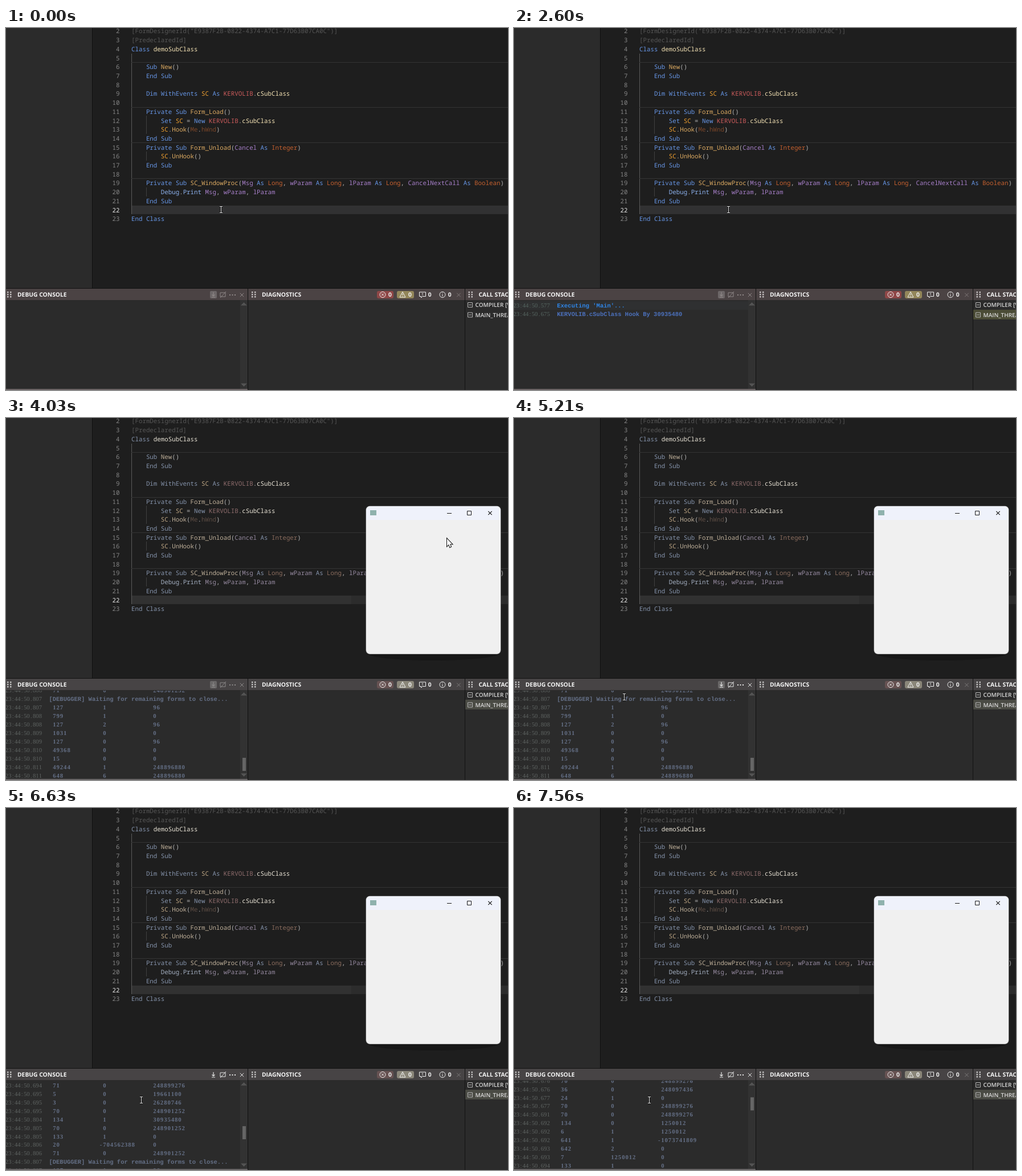
An HTML page with a canvas that plays this animation: 881 px wide and 636 px high, repeating every 7.99 s.

```html
<!DOCTYPE html>
<html lang="en">
<head>
<meta charset="utf-8">
<title>Debug session</title>
<style>
html, body { margin: 0; width: 100%; height: 100%; overflow: hidden; background: #1e1e1e; }
canvas { position: absolute; left: 0; top: 0; }
</style>
</head>
<body>
<canvas id="ide" width="881" height="636"></canvas>
<canvas id="top" width="881" height="636"></canvas>
<script>
const LOOP = 7990;
const ide = document.getElementById('ide');
const base = ide.getContext('2d');
const over = document.getElementById('top').getContext('2d');
let c = base;

const UI = '"Open Sans", "Noto Sans", sans-serif';
const TITLE = '700 10.3px ' + UI;
const CODE_FONT = '10.79px "Noto Sans Mono", monospace';
const STAMP_FONT = '10.67px "Liberation Serif", serif';
const MONO = 'bold 10.48px "Liberation Mono", monospace';
const CW = 6.474, LINE_H = 15.71;
const LOG_H = 14.95, LOG_CW = 6.286, TAB = 14 * LOG_CW;

const code = `[FormDesignerId("E9387F2B-0822-4374-A7C1-77D63B07CA0C")]
[PredeclaredId]
Class demoSubClass

    Sub New()
    End Sub

    Dim WithEvents SC As KERVOLIB.cSubClass

    Private Sub Form_Load()
        Set SC = New KERVOLIB.cSubClass
        SC.Hook(Me.hWnd)
    End Sub
    Private Sub Form_Unload(Cancel As Integer)
        SC.UnHook()
    End Sub

    Private Sub SC_WindowProc(Msg As Long, wParam As Long, lParam As Long, CancelNextCall As Boolean)
        Debug.Print Msg, wParam, lParam
    End Sub

End Class`.split('\n');

const palette = {};
const paint = (color, words) => words.split(' ').forEach(w => palette[w] = color);
paint('#6796e6', 'Class End Sub Dim WithEvents As Private Set New');
paint('#dcaa62', 'Form_Load Form_Unload SC_WindowProc Hook UnHook');
paint('#f0a030', 'SC');
paint('#cd5c5c', 'KERVOLIB');
paint('#f5e3b5', 'demoSubClass cSubClass');
paint('#c4602f', 'Integer Long Boolean');
paint('#a77fc9', 'Cancel Msg wParam lParam CancelNextCall');
paint('#8db2ee', 'Debug Print');
paint('#7c4629', 'Me hWnd');

const log = [];
// rows appear together; their stamps count up from `ms` by `step`
function batch(show, ms, step, rows) {
  rows.split('\n').forEach((row, i) => log.push({ show, row, ms: Math.floor(ms + i * step) }));
}
batch(2480, 577, 0, "Executing 'Main'...");
batch(2600, 675, 0, 'KERVOLIB.cSubClass Hook By 30935480');
batch(2750, 675, .5, `13 0 0
133 1 0
70 0 248899276
36 0 248097436
24 1 0
70 0 248899276`);
batch(2750, 691.8, .37, `70 0 248899276
134 0 1250012
6 1 1250012
641 1 -1073741809
642 2 0
7 1250012 0
133 1 0
20 -704562388 0
71 0 248899276
5 0 19661100
3 0 26280746
70 0 248901252`);
batch(2900, 804.9, .5, `134 1 30935480
70 0 248901252
133 1 0
20 -704562388 0
71 0 248901252
[DEBUGGER] Waiting for remaining forms to close...
127 1 96
799 1 0
127 2 96
1031 0 0
127 0 96
49368 0 0
15 0 0
49244 1 248896880
648 6 248896880`);

const wheel = [6360, 6500, 6630, 6930, 7050, 7050, 7560];

const span = (t, a, b) => Math.min(1, Math.max(0, (t - a) / (b - a)));
const stepped = (t, a, b, n) => Math.floor(span(t, a, b) * n + .001) / n;
const within = (t, a, b) => t >= a && t < b;
const mix = (a, b, u) => a + (b - a) * u;
function bezier(u, a, b, d, e) {
  const v = 1 - u;
  return v * v * v * a + 3 * v * v * u * b + 3 * v * u * u * d + u * u * u * e;
}

function mouseAt(t) {
  if (t < 830) return [377, 319];
  if (t < 3610) return [376, 319];
  if (t < 4030) return [618, 280];
  if (t < 5210) {
    const u = (1 + stepped(t, 4030, 5060, 7)) / 8;
    return [bezier(u, 618, 1160, 640, 232), bezier(u, 280, 120, -280, 549)];
  }
  const u = stepped(t, 5210, 6050, 6), swing = Math.sin(u * Math.PI);
  return [mix(193, 237, u) + 149 * swing, mix(490, 513, u) - 33 * swing];
}

function rect(x, y, w, h, color) { c.fillStyle = color; c.fillRect(x, y, w, h); }
function round(x, y, w, h, r, color) {
  c.fillStyle = color;
  c.beginPath(); c.roundRect(x, y, w, h, r); c.fill();
}
function text(s, x, y, font, color) {
  c.font = font; c.fillStyle = color; c.fillText(s, x, y);
}
// strokes an SVG path placed at x, y
function icon(x, y, d, color, width = 1) {
  c.save();
  c.translate(x, y);
  c.strokeStyle = color; c.lineWidth = width;
  c.stroke(new Path2D(d));
  c.restore();
}
const CROSS = 'M-3.2-3.2L3.2 3.2M-3.2 3.2L3.2-3.2';
const CIRCLE = 'M-5 0A5 5 0 1 1 5 0A5 5 0 1 1-5 0';
const BEAM = 'M-2-5.5H3M.5-5.5V5.5M-2 5.5H3';
const ARROW = 'M0 0V13L3 10L5 15L7 14L5 9.5H9Z';

function grid(s, x, y, pitch, font, color) {
  c.textAlign = 'center';
  [...s].forEach((ch, i) => text(ch, x + (i + .5) * pitch, y, font, color));
  c.textAlign = 'left';
}

function drawCode(t) {
  rect(0, 0, 881, 457, '#1e1e1e');
  rect(0, 0, 151, 457, '#2b2b2b');
  rect(151, 0, 1, 457, '#101010');
  rect(220, 312, 661, 15, '#313132');
  if (t >= 2750) rect(606, 312, 275, 15, '#2c2c2c');
  rect(220, 45, 1, 282, '#5a5a5a');

  code.forEach((line, i) => {
    const n = i + 2, y = 9.4 + i * LINE_H, top = Math.floor(y - 11.7);
    if (/Sub \w+\(/.test(line)) rect(220, top, 661, 1, '#343434');
    if (line.startsWith('        ')) rect(246, top, 1, 16, '#404040');
    c.textAlign = 'right';
    text(n, 199.5, y, CODE_FONT, n === 22 ? '#e6e6e6' : '#858585');
    c.textAlign = 'left';
    if (line[0] === '[') return text(line, 220, y, CODE_FONT, '#565656');
    for (const m of line.matchAll(/\w+|[^\w\s]+/g)) {
      const call = m[0] === 'New' && line[m.index + 3] === '(';
      const color = call ? palette.Hook : palette[m[0]] || '#b4b4b4';
      text(m[0], 220 + m.index * CW, y, CODE_FONT, color);
    }
  });

  if (within(t, 150, 550) || within(t, 1080, 1580) || within(t, 2110, 2480))
    rect(245, 312, 2, 16, '#c8c8c8');
}

function panel(x, w, title, titleX) {
  rect(x, 458, w, 20, '#4b4344');
  rect(x, 478, w, 158, '#2b2b2b');
  for (let i = 0; i < 6; i++) rect(titleX - 18 + i % 2 * 5, 463 + (i >> 1) * 4, 2.5, 2.5, '#c4c0c0');
  text(title, titleX, 472, TITLE, '#f6f6f6');
}

function drawLog(t) {
  const rows = log.filter(r => r.show <= t), n = rows.length;
  const off = wheel.filter(w => w <= t).length * 42.8;
  const top = n > 9 ? 628 - (n - 1) * LOG_H + off : 487.5;
  c.save();
  c.beginPath(); c.rect(0, 479, 412, 155); c.clip();
  if (n) rect(0, top - 7.5, 412, 15, '#2f3031');
  rows.forEach(({ row, ms }, i) => {
    const y = top + i * LOG_H + 3.5;
    grid('23:44:50.' + ms, -1, y, 5.33, STAMP_FONT, '#566661');
    if (/[a-z]/.test(row)) return text(row, 75.5, y, MONO, i ? '#4c71bd' : '#2f86e8');
    row.split(' ').forEach((v, k) => {
      const x = 75.5 + k * TAB + (v[0] === '-' ? 0 : LOG_CW);
      grid(v, x, y, LOG_CW, 'bold ' + STAMP_FONT, '#4c71bd');
    });
  });
  c.restore();

  rect(411, 478, 13, 156, '#323232');
  icon(417.5, 485, 'M-3 1.5L0-1.5L3 1.5Z', '#555', 2);
  icon(417.5, 627, 'M-3-1.5L0 1.5L3-1.5Z', '#555', 2);
  if (n > 9) {
    const h = n < log.length ? 41 : 23;
    rect(415, 620 - h - off * .296, 6, h, '#656565');
  }
  rect(0, 634, 424, 2, '#6a6263');
}

function drawTools(t) {
  const ink = t >= 5210 ? '#e4e4e4' : '#8f8888';
  if (t < 5630) round(358, 462, 12, 13, 2, '#6c6667');
  icon(364, 468, 'M0-4V3M-2.5.5L0 3L2.5.5M-3 5H3', ink, 1.2);
  icon(380.5, 468.5, 'M-4.5-3.5H4.5V3.5H-4.5ZM-4.5 5.5L5.5-5.5', ink);
  for (let i = 0; i < 3; i++) rect(392 + i * 4.5, 468, 2, 2, ink);
  icon(414, 469, CROSS, ink);
}

function drawDiagnostics() {
  const white = '#f0f0f0';
  round(651, 462, 29, 13, 3, '#8f4747');
  round(686, 462, 30, 13, 3, '#93865a');
  icon(661, 468.5, CIRCLE + 'M-2-2L2 2M-2 2L2-2', white);
  icon(696, 468.5, 'M0-5L5 4.5H-5ZM0-2V1.5M0 2.5V3.5', white);
  icon(731, 468.5, 'M-5.5-4.5H5.5V3H0L-2.5 5.5V3H-5.5ZM0-3V0M0 1V2', white);
  icon(766, 468.5, CIRCLE + 'M0-1V3M0-3.5V-2.5', white);
  for (let i = 0; i < 4; i++) text('0', 671 + i * 34.9, 472, TITLE, white);
  icon(794.5, 469, CROSS, '#807979');
}

function drawStack(t) {
  if (t >= 2480) rect(806, 495, 75, 17, '#4b4c36');
  ['COMPILER [VM]', 'MAIN_THREAD'].forEach((s, i) => {
    const y = 486 + i * 17.5;
    icon(814.5, y + .5, 'M-4-4H4V4H-4ZM-2.5 0H2.5', '#b8b8b8');
    text(s, 823.5, y + 4, '600 10px ' + UI, '#d8d8d8');
  });
}

function drawWindow(active) {
  if (active) {
    c.fillStyle = '#171717';
    c.beginPath(); c.ellipse(750, 413, 116, 13, 0, 0, Math.PI); c.fill();
  }
  round(631.5, 154.5, 237, 260.5, 7, '#8a8a8a');
  round(632, 155, 236, 259.5, 7, '#f0f0f0');
  round(632, 155, 236, 24, [7, 7, 0, 0], active ? '#eff2fb' : '#f2f2f2');
  rect(639, 162, 11, 9, '#8fb2ad');
  icon(778, 167.5, 'M-4 0H4', '#1a1a1a');
  icon(813, 167, 'M-3.5-3.5H3.5V3.5H-3.5Z', '#1a1a1a');
  icon(849.5, 167, CROSS, '#1a1a1a', 1.2);
}

function drawMouse(x, y) {
  const overForm = within(x, 632, 868) && within(y, 155, 415);
  if (overForm || within(y, 458, 478)) {
    icon(x, y, ARROW, '#111', 2);
    c.save();
    c.translate(x, y);
    c.fillStyle = '#fff'; c.fill(new Path2D(ARROW));
    c.restore();
  } else {
    icon(x, y, BEAM, '#111', 2.4);
    icon(x, y, BEAM, '#e2e2e2');
  }
}

function render(t) {
  c = base;
  drawCode(t);
  rect(0, 457, 881, 179, '#121212');
  panel(0, 424, 'DEBUG CONSOLE', 20);
  drawLog(t);
  drawTools(t);
  panel(425, 380, 'DIAGNOSTICS', 449);
  drawDiagnostics();
  panel(806, 75, 'CALL STACK', 829.5);
  drawStack(t);
  // the editor loses its colour once the form takes focus
  ide.style.filter = `saturate(${1 - .7 * stepped(t, 2750, 3460, 5)})`;

  c = over;
  c.clearRect(0, 0, 881, 636);
  if (t >= 2750) drawWindow(t >= 2900);
  drawMouse(...mouseAt(t).map(Math.round));
}

base.textRendering = over.textRendering = 'geometricPrecision';
let start;
function tick(now) {
  start ??= now;
  render((now - start) % LOOP);
  requestAnimationFrame(tick);
}
render(0);
requestAnimationFrame(tick);
</script>
</body>
</html>
```
